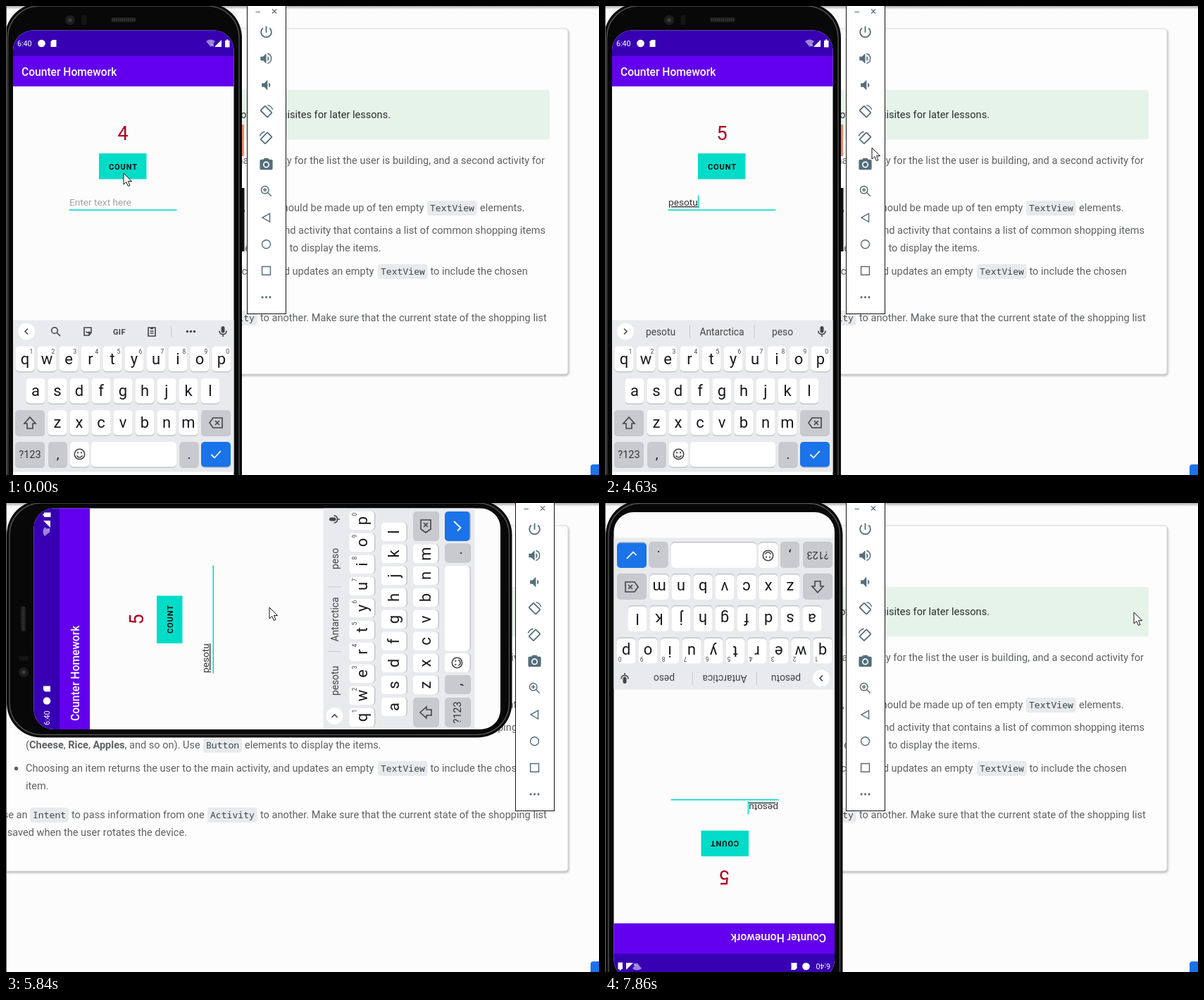
Write an HTML page that moves like this. It is 842x665 px and loops after 8000 ms.

```html
<!DOCTYPE html>
<html lang="en">
<head>
<meta charset="utf-8">
<title>Counter Homework</title>
<style>
  html, body { margin: 0; width: 100%; height: 100%; overflow: hidden; background: #fcfcfc; }
  svg { display: block; }
  text { font-family: Roboto, sans-serif; white-space: pre; }
  .mid { text-anchor: middle; }
  .end { text-anchor: end; }
  .code { font: 500 13.1px "Noto Sans Mono", monospace; fill: #37474f; }
  .line { fill: none; stroke: currentColor; stroke-width: 1.6; }
  #card { filter: drop-shadow(1px 2px 1.5px #0004); }
</style>
</head>
<body>
<svg id="stage" width="842" height="665" viewBox="0 0 842 665">
  <defs>
    <linearGradient id="topShade" x2="0" y2="1">
      <stop stop-color="#aaa"/><stop offset="1" stop-color="#fcfcfc"/>
    </linearGradient>
    <clipPath id="cutPortrait"><path d="M0 0H339V333H10V320L0 305Z"/></clipPath>
    <clipPath id="cutLandscape"><path d="M0 0H318L328 8H338V333H0Z"/></clipPath>
    <clipPath id="screen"><rect x="10" y="34.5" width="313.5" height="662.5" rx="28"/></clipPath>
  </defs>
  <g id="page"></g>
  <g id="window"><g id="phone"></g><rect id="strip" x="320" y="1" width="19" height="6" fill="#080808"/></g>
  <rect width="1" height="665" fill="#666"/>
  <g id="tools" color="#546e7a"></g>
  <path id="cursor" d="M0 0V16L3.8 12.6 6.4 18.5 9 17.4 6.5 11.6H11.5Z" fill="#fff" stroke="#111"/>
</svg>
<script>
const LOOP = 8000, WORD = 'pesotu';
const $ = id => document.getElementById(id);
const text = (x, y, size, str, fill, attrs = '') =>
  `<text x="${x}" y="${y}" font-size="${size}" fill="${fill}" ${attrs}>${str}</text>`;
const mid = (x, y, size, str, fill, attrs = '') => text(x, y, size, str, fill, `class="mid" ${attrs}`);
const rect = (x, y, w, h, fill, rx = 0, attrs = '') =>
  `<rect x="${x}" y="${y}" width="${w}" height="${h}" fill="${fill}" rx="${rx}" ${attrs}/>`;
const path = (d, attrs = 'class="line"') => `<path d="${d}" ${attrs}/>`;
const circle = (x, y, r, attrs) => `<circle cx="${x}" cy="${y}" r="${r}" ${attrs}/>`;
const dots = (x, y, gap) => [-gap, 0, gap].map(d => circle(x + d, y, 1.7, 'fill="currentColor"')).join('');

function drawPage() {
  const body = (x, y, str, side = '') => text(x, y, 14.57, str, '#5f6163', `class="${side}"`);
  const chip = (x, y, str) => rect(x, y - 15, str.length * 7.9 + 7.5, 21, '#e8eaed', 4) +
    `<text class="code" x="${x + 4}" y="${y}">${str}</text>`;
  return rect(0, 0, 842, 5, 'url(#topShade)') +
    rect(-20, 32, 818, 490, '#fdfdfd', 4, 'id="card" stroke="#d5d7da"') +
    rect(-20, 119, 792, 70.5, '#e6f3e9', 4) +
    text(546, 159, 14.57, 'These projects are not prerequisites for later lessons.', '#2b2d2f', 'class="end"') +
    body(765, 224, 'main activity for the list the user is building, and a second activity for', 'end') +
    body(593.5, 291, ', which should be made up of ten empty', 'end') + chip(598, 291, 'TextView') + body(673, 291, 'elements.') +
    body(766, 323, 's a second activity that contains a list of common shopping items', 'end') +
    body(28, 348, '(<tspan font-weight="bold">Cheese</tspan>, <tspan font-weight="bold">Rice</tspan>, ' +
      '<tspan font-weight="bold">Apples</tspan>, and so on). Use') + chip(280, 348, 'Button') +
    body(339, 348, 'elements to display the items.') +
    circle(14.5, 376.5, 2.7, 'fill="#5f6163"') +
    body(28, 381, 'Choosing an item returns the user to the main activity, and updates an empty') +
    chip(528, 381, 'TextView') + body(602.5, 381, 'to include the chosen') + body(28, 406, 'item.') +
    body(30.5, 447, 'Use an', 'end') + chip(34, 447, 'Intent') + body(93, 447, 'to pass information from one') +
    chip(286, 447, 'Activity') + body(361, 447, 'to another. Make sure that the current state of the shopping list') +
    body(257, 472, 'is saved when the user rotates the device.', 'end') +
    rect(830, 650, 30, 30, '#1a73e8', 4);
}

function drawKeyboard() {
  const GREY = '#c8cad0', INK = '#18191b';
  const key = (x, y, w, fill = '#fff') => rect(x, y + 1, w, 36, '#c3c5c9', 5) + rect(x, y, w, 35.5, fill, 5);
  const row = (letters, x0, y) => [...letters].map((c, i) =>
    key(x0 + 31 * i - 13.5, y, 27, '#fff') + mid(x0 + 31 * i, y + 25, 22, c, INK)).join('');
  const hints = [...'1234567890'].map((c, i) => mid(36 + 31 * i, 492.5, 8.5, c, '#444')).join('');
  return rect(10, 445.5, 314, 215, '#e8eaed') + row('qwertyuiop', 27, 482.5) + hints +
    row('asdfghjkl', 42, 528) + row('zxcvbnm', 73, 573) +
    key(13, 573, 42, GREY) + path('M34 583L42 592H38V599H30V592H26Z') +
    key(277, 573, 42, GREY) + path('M289 591L294 584H307V598H294ZM297 588L303 594M303 588L297 594') +
    key(13, 618, 42, GREY) + mid(34, 641, 14.5, '?123', '#333') +
    key(60, 618, 27, GREY) + mid(73.5, 642, 19, ',', INK) +
    key(91, 618, 27) + circle(104.5, 635.5, 7.2, 'class="line"') +
    path('M100.5 637.5Q104.5 643 108.5 637.5M102 632V634.5M107 632V634.5') +
    key(121, 618, 121) + key(246.5, 618, 27, GREY) + mid(260, 642, 19, '.', INK) +
    key(277, 618, 42, '#1a73e8') + path('M291.5 636L296 640.5 305 631', 'fill="none" stroke="#fff" stroke-width="1.8"') +
    circle(29, 461.5, 12, 'fill="#fff"') + path('', 'id="chevron" class="line"') +
    rect(305.5, 454, 5, 9.5, '#444', 2.5) + path('M303 460.5Q303 465.5 308 465.5T313 460.5M308 465.5V469') +
    `<g id="actions">${circle(69, 460, 4.3, 'class="line"')}${path('M72 463L77 468')}` +
    path('M111 456H121V463L118 467H111ZM118 467V463H121M113.5 461.5Q116 465 118.5 461.5') +
    mid(161, 465.5, 11, 'GIF', '#444', 'font-weight="bold" letter-spacing=".5"') +
    path('M202 456H212V468H202ZM205 457.5H209M204.5 461H209.5M204.5 464H209.5') +
    rect(234, 454, 1, 15, '#c5c7ca') + dots(262.5, 461.5, 5) + '</g>' +
    `<g id="suggestions">${rect(120, 452, 1, 19, '#c5c7ca')}${rect(211.5, 452, 1, 19, '#c5c7ca')}` +
    [79, 166, 252].map((x, i) => mid(x, 466.5, 13.8, '', '#444', `id="guess${i}"`)).join('') + '</g>';
}

function drawPhone() {
  const TEAL = '#00dcc8';
  const grille = Array.from({ length: 12 }, (_, i) => rect(151 + i * 2.8, 17.5, 1.2, 4, '#3a3a3a')).join('');
  return rect(333, 168, 5, 45, '#f0866c') + rect(333, 258, 5.5, 90, '#111') +
    rect(-1.5, -4, 336.5, 717.5, '#080808', 49) +
    rect(2.5, 0, 328.5, 709.5, 'none', 45, 'stroke="#505050" stroke-width="1.4"') +
    circle(91, 20, 7, 'fill="#1d1d1d"') + circle(91, 20, 2.8, 'fill="#3b3b3f"') + rect(107.5, 13, 7, 14, '#141414', 3) +
    rect(149, 16, 36, 7, '#1c1c1c', 3.5) + grille +
    `<g clip-path="url(#screen)">${rect(10, 34, 314, 663, '#fcfcfc')}` +
    rect(10, 34, 314, 37, '#3700b3') + rect(10, 71, 314, 43, '#6200ee') +
    text(16, 57, 10.7, '6:40', '#fff') + circle(50.5, 53, 5.3, 'fill="#fff"') +
    path('M66 48H71.5V58H63.5V50.5Z', 'fill="#fff"') +
    path('M284 50Q290.5 45 297 50L290.5 58Z', 'fill="#9c84d8"') +
    path('M292 54L295 57M295 54L292 57', 'stroke="#fff"') +
    path('M306 48V58H296Z', 'fill="#fff"') + path('M311 49H313V47.5H315.5V49H317.5V58.5H311Z', 'fill="#fff"') +
    text(22, 99, 15.6, 'Counter Homework', '#fff', 'font-weight="500"') +
    mid(166, 189.5, 27, '', '#b00020', 'id="count"') +
    rect(132, 209, 67.5, 36.5, TEAL) + mid(166.5, 231.5, 11, 'COUNT', '#111', 'font-weight="bold" letter-spacing=".9"') +
    text(90, 283, 13.7, '', '#333', 'id="field"') + rect(89.5, 288.5, 153, 1.6, TEAL) +
    rect(0, 268.5, 1.5, 18.5, TEAL, 0, 'id="caret"') +
    `<g color="#444">${drawKeyboard()}</g></g>`;
}

function drawTools() {
  const solid = d => path(d, 'fill="currentColor" fill-rule="evenodd"');
  const turn = flip => `<g transform="translate(12 12) scale(${flip} 1)">` +
    '<rect class="line" x="-5" y="-7.5" width="10" height="15" rx="1" transform="rotate(-45)" style="stroke-width:2"/>' +
    path('M2 -10Q8 -9 10 -3') + '</g>';
  const icons = [
    solid('M13 3h-2v10h2V3zm4.83 2.17l-1.42 1.42C17.99 7.86 19 9.81 19 12c0 3.87-3.13 7-7 7s-7-3.13-7-7c0-2.19 1.01-4.14 2.58-5.42L6.17 5.17C4.23 6.82 3 9.26 3 12c0 4.97 4.03 9 9 9s9-4.03 9-9c0-2.74-1.23-5.18-3.17-6.83z'),
    solid('M3 9v6h4l5 5V4L7 9ZM14 8Q19 12 14 16Z') + path('M14 4.3A8 8 0 0 1 14 19.7', 'class="line" stroke-width="2"'),
    solid('M5 9v6h4l5 5V4L9 9ZM16 8Q21 12 16 16Z'),
    turn(1), turn(-1),
    solid('M9 2L7.2 4H4Q2 4 2 6V18Q2 20 4 20H20Q22 20 22 18V6Q22 4 20 4H16.8L15 2ZM12 7A5 5 0 0 1 12 17A5 5 0 0 1 12 7Z') + circle(12, 12, 3.2, 'fill="currentColor"'),
    circle(10, 10, 5.8, 'class="line"') + path('M14.5 14.5L20 20M7 10H13M10 7V13'),
    path('M17.5 5.5V18.5L6 12Z'), circle(12, 12, 6.6, 'class="line"'), path('M5.5 5.5H18.5V18.5H5.5Z'), dots(12, 12, 6)
  ];
  return rect(342.5, -2, 55, 438.5, '#fff', 0, 'stroke="#111"') +
    path('M354.5 8.5H361M378 4.5L384 10.5M384 4.5L378 10.5', 'stroke="currentColor" stroke-width="1.1"') +
    icons.map((icon, i) => `<g transform="translate(358.6 ${26 + 37.6 * i}) scale(.91)">${icon}</g>`).join('');
}

$('page').innerHTML = drawPage();
$('phone').innerHTML = drawPhone();
$('tools').innerHTML = drawTools();

// Pointer stops: time, x, y
const POINTER = [
  [0, 167, 237], [340, 167, 237], [1270, 144, 273], [4230, 144, 273], [4630, 379, 201], [4750, 379, 201],
  [5170, 374, 148], [6270, 374, 148], [6930, 725, 92], [7060, 741, 160], [7200, 741, 160], [7350, 751, 155], [LOOP, 751, 155]
];
const CARET_ON = [[340, 870], [1270, 1950], [2450, 4080], [4630, 5170], [5450, 5840], [6400, 6930], [7190, LOOP]];
const within = (t, a, b) => t >= a && t < b;
const show = (id, on) => $(id).setAttribute('visibility', on ? 'visible' : 'hidden');

function render(t) {
  const typed = WORD.slice(0, Math.max(0, Math.floor((t - 2590) / 137) + 1));
  const field = $('field');
  $('count').textContent = t < 340 ? 4 : 5;
  field.textContent = typed || 'Enter text here';
  field.setAttribute('fill', typed ? '#333' : '#a3a3a3');
  field.setAttribute('text-decoration', typed ? 'underline' : 'none');
  $('caret').setAttribute('x', typed ? 90 + field.getComputedTextLength() : 89.5);
  show('caret', CARET_ON.some(([a, b]) => within(t, a, b)));

  show('actions', !typed);
  show('suggestions', typed);
  $('chevron').setAttribute('d', typed ? 'M27 457.5L31 461.5 27 465.5' : 'M31 457.5L27 461.5 31 465.5');
  [typed, 'Antarctica', t < 3560 ? 'pest' : 'peso'].forEach((word, i) => $('guess' + i).textContent = word);

  const landscape = within(t, 5840, 7860), cutPortrait = within(t, 5580, 5840), cutLandscape = within(t, 7600, 7860);
  $('phone').setAttribute('transform', t >= 7860 ? 'translate(336 710) rotate(180)' :
    landscape ? 'translate(5 331) rotate(-90)' : '');
  $('window').setAttribute('clip-path', cutPortrait ? 'url(#cutPortrait)' : cutLandscape ? 'url(#cutLandscape)' : 'none');
  show('strip', cutPortrait);
  $('tools').setAttribute('transform', `translate(${within(t, 5580, 7860) ? 381 : 0} 0)`);

  const next = POINTER.findIndex(p => p[0] > t);
  const [t0, x0, y0] = POINTER[next - 1], [t1, x1, y1] = POINTER[next];
  const k = (t - t0) / (t1 - t0);
  $('cursor').setAttribute('transform', `translate(${x0 + (x1 - x0) * k} ${y0 + (y1 - y0) * k})`);
}

const start = performance.now();
(function tick() {
  render((performance.now() - start) % LOOP);
  requestAnimationFrame(tick);
})();
</script>
</body>
</html>
```
